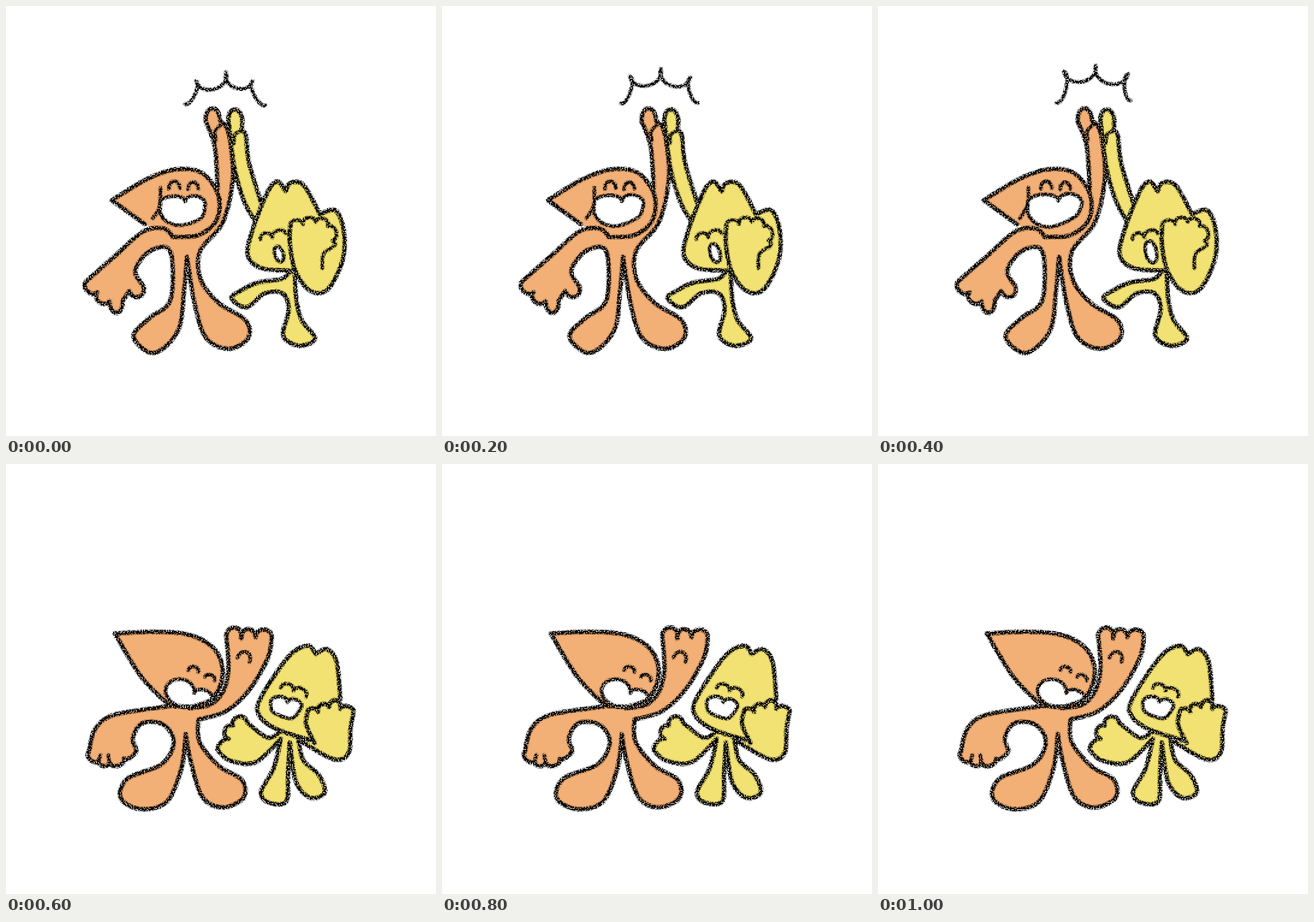
An HTML page for the animation above (1200 ms loop, 715 px wide and 715 px high).

```html
<!DOCTYPE html>
<html lang="en">
<head>
<meta charset="utf-8">
<title>High five</title>
<style>
html, body { margin: 0; height: 100%; overflow: hidden; background: #fff; }
svg { display: block; width: 100%; height: 100%; }
.ink { fill: none; stroke: #000; stroke-linecap: round; stroke-linejoin: round; }
</style>
</head>
<body>
<svg id="stage" viewBox="0 0 715 715"></svg>
<script>
const ORANGE = '#f2b077', YELLOW = '#f2e274', WHITE = '#fff', NONE = 'none';
const HOLD = 200, DRAWINGS = 3;

// Each shape: [fill, key points, key points at the end of the pose].
// A smooth line runs through the points. "/" makes the point before it a corner;
// "x,y^h" is reached by a round bump of height h on the left of the direction of travel.
const clap = [
  // orange: body, finger, head, cheek, eyes, mouth
  [ORANGE, `352,303 347,233 332,192 356,191^1.2 / 367,202 374,232 377,290 360,361 323,407
    324,455 354,494 398,522 403,552 370,570 332,551 313,492 301,417 /
    296,475 286,540 246,577 212,550 237,520 272,492 277,432 268,402 237,409 215,440
    228,465 205,474^.8 194,490 172,491^1.2 152,476^.6 134,457^.55 182,415 228,375 262,370 277,383`],
  [NONE, '349,224 348,208 358,197'],
  [ORANGE, `277,384 320,381 350,356 353,314 325,277 280,272 232,289 176,323 / 231,363`],
  [NONE, '257,302 255,335 244,353', '250,302 249,330 236,353'],
  [NONE, '271,304 289,303^.9'],
  [NONE, '303,305 320,304^.9'],
  [WHITE, '298,325 257,328^-.33 257,345 270,360 295,364 325,352 331,332 298,325^-.5',
    '300,324 249,328^-.33 250,346 264,362 290,367 328,350 339,330 300,324^-.5'],
  // yellow: arm, finger, legs, head, eyes, mouth, fist, its fingers
  [YELLOW, '413,356 396,325 380,270 370,192 393,190^1.1 392,207 / 399,216 404,260 424,326'],
  [NONE, '379,228 381,213 393,207'],
  [YELLOW, `472,442 458,454 418,460 389,474 375,486 400,501 430,478 460,478 470,505
    461,548 487,565 514,553 492,523 483,490 480,443`],
  [YELLOW, `475,440 425,436 402,414 410,372 430,320 441,299 453,292 465,308 /
    473,294 495,298 522,346`],
  [NONE, '423,388 443,385^.6 465,378^.5'],
  [WHITE, '450,400 458,425^.36 450,400^.36', '450,391 458,427^.33 450,391^.33'],
  [YELLOW, '522,346 548,340 562,375 559,425 534,472 505,473 481,440 472,395 473,363'],
  [NONE, `473,363 494,363^.45 515,359^.6 535,366^.6 543,390^.55 / 547,398 528,412 526,436`],
  // spark
  [NONE, '298,163 316,125^-.25 366,110^-.55 410,125^-.57 431,165^-.25',
    '297,161 309,109^-.25 362,99^-.55 416,113^-.57 420,157^-.25']
];

const wave = [
  // orange: body, palm, head, eyes, mouth
  [ORANGE, `305,406 340,400 361,378 370,340 366,284 391,290^.8 415,288^.8 442,287^.6
    436,321 405,375 366,411 320,425 / 322,462 354,502 392,525 395,555 360,571 326,553
    306,490 299,449 / 292,505 268,561 225,574 191,556 202,523 259,499 279,462 261,433
    227,431 211,455 216,473 196,490^.3 172,496^.5 154,494^.55 138,478^.5 148,441 180,417 269,403`],
  [NONE, '172,496 170,484'],
  [NONE, '154,494 157,484'],
  [NONE, '385,322 405,329^.85'],
  [ORANGE, `181,282 240,279 300,283 342,303 360,338 353,376 325,402 272,402 / 225,354 181,282`],
  [NONE, '303,343 320,346^.6'],
  [NONE, '331,354 347,360^.5'],
  [WHITE, '313,381 265,378^-.6 269,389 282,400 304,404 343,392 / 313,381^-.45'],
  // yellow: arm and legs, head, eyes, mouth, fist
  [YELLOW, `456,445 435,455 401,430 377,435^-.7 370,457^-.6 353,477^-.3 372,493 415,496
    457,457 / 445,506 424,545 437,563 466,561 469,515 472,463 / 482,528 506,555 530,546
    520,517 494,492 486,456`],
  [YELLOW, `556,391 550,330 534,308 515,316 / 502,302 470,320 423,390 421,418 450,441 505,459`],
  [NONE, '457,372 478,377^.55 499,387^.55'],
  [WHITE, '468,396 440,398^-.5 445,413 475,423 491,405 468,396^-.5'],
  [YELLOW, `513,464 499,433 502,411 519,412^.4 537,404^.6 556,407^.9 578,412^.4
    573,440 570,480 545,491 487,459`]
];

const parse = text => text.trim().split(/\s+/).map(s => s === '/' ? null : s.split(/[,^]/).map(Number));

// Catmull-Rom spline as cubic Béziers
function spline(pts) {
  let d = '';
  for (let j = 0; j < pts.length - 1; j++) {
    const b = pts[j], c = pts[j + 1], a = pts[j - 1] || b, e = pts[j + 2] || c;
    d += `C${b.map((v, k) => v + (c[k] - a[k]) / 6)} ${c.map((v, k) => v - (e[k] - b[k]) / 6)} ${c}`;
  }
  return d;
}

function bump([x, y], [X, Y], h) {
  const nx = (Y - y) * h, ny = (x - X) * h;
  return `C${x + nx},${y + ny} ${X + nx},${Y + ny} ${X},${Y}`;
}

function outline(from, to = from, t = 0) {
  const goal = parse(to);
  let d = '', run = [];
  const restart = p => { d += spline(run); run = [p]; };
  parse(from).forEach((key, i) => {
    if (!key) return restart(run.at(-1));
    const [x, y, h] = key.map((v, k) => v + (goal[i][k] - v) * t);
    if (!d && !run.length) d = `M${x},${y}`;
    if (h === undefined) return run.push([x, y]);
    const prev = run.at(-1);
    restart([x, y]);
    d += bump(prev, [x, y], h);
  });
  return d + spline(run);
}

// Crayon: a soft stroke multiplied by steep noise
const crayon = n => `
  <filter id="crayon${n}" filterUnits="userSpaceOnUse" x="0" y="0" width="715" height="715"
    color-interpolation-filters="sRGB">
    <feTurbulence type="fractalNoise" baseFrequency=".5" numOctaves="2" seed="${n * 7 + 3}"/>
    <feColorMatrix values="0 0 0 0 0  0 0 0 0 0  0 0 0 0 0  0 0 0 1 0" result="grain"/>
    <feGaussianBlur in="SourceGraphic" stdDeviation="1"/>
    <feComposite in2="grain" operator="arithmetic" k1="8" k2="-2.8"/>
  </filter>`;

function drawing(shapes, step, n) {
  let fills = '', ink = '';
  for (const [fill, from, to] of shapes) {
    const d = outline(from, to, step / (DRAWINGS - 1));
    const bold = fill === ORANGE || fill === YELLOW;
    fills += `<path d="${d}" fill="${fill}"/>`;
    ink += `<path d="${d}" stroke-width="${bold ? 6 : 4.8}"/>`;
  }
  return `${crayon(n)}<g class="drawing">${fills}
    <g class="ink" filter="url(#crayon${n})">${ink}</g></g>`;
}

const stage = document.getElementById('stage');
stage.innerHTML = [clap, wave].map((shapes, p) =>
  Array.from({ length: DRAWINGS }, (_, i) => drawing(shapes, i, p * DRAWINGS + i)).join('')
).join('');
const drawings = [...stage.querySelectorAll('.drawing')];

let start, shown;
function show(n) {
  if (n === shown) return;
  shown = n;
  drawings.forEach((g, i) => g.style.display = i === n ? '' : 'none');
}
function tick(now) {
  start ??= now;
  show(Math.floor((now - start) / HOLD) % drawings.length);
  requestAnimationFrame(tick);
}
show(0);
requestAnimationFrame(tick);
</script>
</body>
</html>
```
